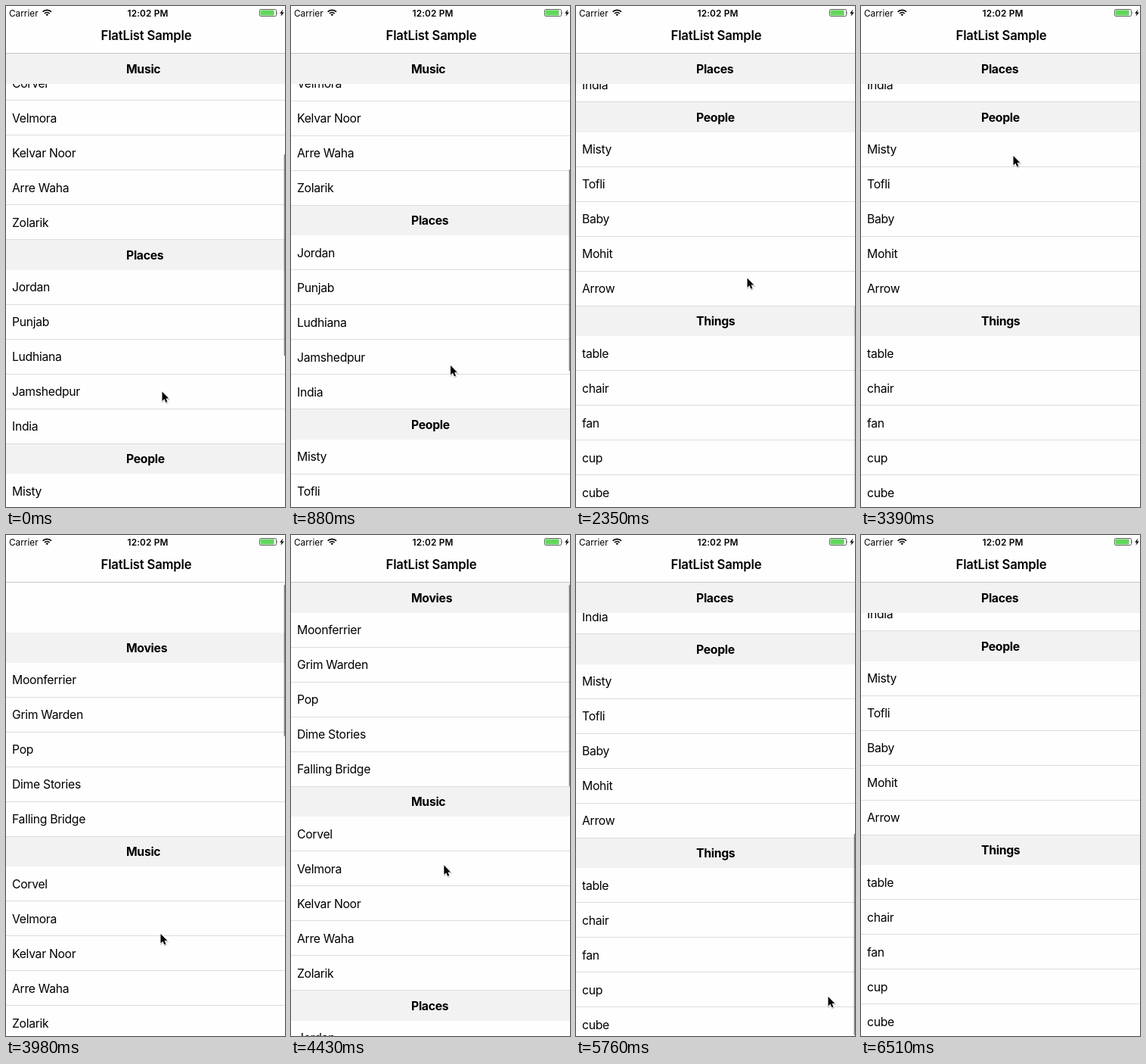
Write an HTML page that moves like this. It is 369x662 px and loops after 6810 ms.

```html
<!DOCTYPE html>
<html lang="en">
<head>
<meta charset="utf-8">
<title>FlatList Sample</title>
<style>
  html, body { margin: 0; width: 100%; height: 100%; overflow: hidden; background: #fefefe; }
  svg { display: block; width: 100vw; height: 100vh; }
  text { font-family: Inter, Roboto, sans-serif; fill: #000; white-space: pre; }
  .row { font-size: 15.75px; letter-spacing: -.3px; }
  .head { font-size: 15.75px; font-weight: 700; letter-spacing: -.3px; }
  .title { font-size: 16.7px; font-weight: 600; letter-spacing: -.2px; }
  .status { font-size: 11.8px; }
  rect { shape-rendering: crispEdges; }
  .smooth { shape-rendering: auto; }
</style>
</head>
<body>
<svg viewBox="0 0 369 662">
  <defs>
    <clipPath id="view"><rect y="63" width="369" height="599"/></clipPath>
  </defs>
  <rect width="369" height="662" fill="#fefefe"/>
  <g clip-path="url(#view)">
    <g id="rows"></g>
    <g id="heads"></g>
    <rect id="bar" class="smooth" x="367.7" width="3" rx="1" fill="#000"/>
  </g>
  <rect y="62" width="369" height="1" fill="#c6c6c6"/>
  <text class="status" x="4" y="13.8">Carrier</text>
  <g fill="none" stroke="#000" stroke-width="1.7">
    <path d="M48.6 7.6A8.2 8.2 0 0 1 60 7.6"/>
    <path d="M50.9 10A5 5 0 0 1 57.7 10"/>
    <path d="M52.5 11.3A2.7 2.7 0 0 1 56.1 11.3L54.3 13.3Z" fill="#000" stroke="none"/>
  </g>
  <text class="status" x="187.5" y="13.8" text-anchor="middle" font-weight="600" letter-spacing=".15">12:02 PM</text>
  <rect class="smooth" x="335.5" y="4.5" width="22" height="9" rx="1.6" fill="#fefefe" stroke="#555" stroke-width=".9"/>
  <rect class="smooth" x="336.6" y="5.6" width="18" height="6.8" rx=".6" fill="#62d75c"/>
  <path d="M358.5 7.4Q360.1 9 358.5 10.7Z" fill="#555"/>
  <path d="M366.2 4.6L362.2 9.8H364.6L363.4 13.8L367.8 8.4H365.2Z"/>
  <text class="title" x="185.5" y="44.5" text-anchor="middle">FlatList Sample</text>
  <g id="cursor">
    <g transform="scale(.93)">
      <path d="M.4 1.2V14.6L3.5 11.8L5.6 16.6L8 15.6L5.9 10.9H10Z" opacity=".22" stroke="#000" stroke-width="1.6"/>
      <path d="M0 0V13.4L3.1 10.6L5.2 15.4L7.4 14.4L5.4 9.8H9.4Z" stroke="#fff" stroke-width="1.6" paint-order="stroke" stroke-linejoin="round"/>
    </g>
  </g>
</svg>
<script>
const LOOP = 6810, STEP = 147.3; // the screen refreshes once per step
const TOP = 63, VIEW = 599, HEAD = 39.5, ROW = 46;
const SECTION = HEAD + 5 * ROW, END = 744.5;

const sections = [
  ['Movies', 'Moonferrier', 'Grim Warden', 'Pop', 'Dime Stories', 'Falling Bridge'],
  ['Music', 'Corvel', 'Velmora', 'Kelvar Noor', 'Arre Waha', 'Zolarik'],
  ['Places', 'Jordan', 'Punjab', 'Ludhiana', 'Jamshedpur', 'India'],
  ['People', 'Misty', 'Tofli', 'Baby', 'Mohit', 'Arrow'],
  ['Things', 'table', 'chair', 'fan', 'cup', 'cube']
];

const lin = u => u;
const drag = u => u ** 2.5;
const glide = u => 1 - (1 - u) ** 2.5;
const both = u => u * u * (3 - 2 * u);

// Moves: [first step, last step, easing, end value...]; values hold in between
const scroll = { from: [293], moves: [
  [0, 8, drag, 440], [8, 12, glide, 756], [12, 15, glide, END],
  [23, 27, both, -66], [27, 30, glide, 0],
  [30, 33, drag, 182.5], [33, 40, glide, END]
] };
const pointer = { from: [206.5, 509.5], moves: [
  [0, 9, drag, 226.5, 359.5], [16, 17, lin, 227, 473], [17, 20, both, 235, 236],
  [21, 23, both, 201.5, 198], [23, 27, both, 204.5, 527],
  [28, 33, both, 198.5, 269.5], [33, 39, both, 333.5, 610], [39, 41, lin, 360, 690]
] };
const fade = { from: [1], moves: [
  [13, 16, lin, 0], [23, 24, lin, 1], [41, 44, lin, 0]
] };

function at({ from, moves }, k) {
  let now = from;
  for (const [a, b, ease, ...to] of moves) {
    if (k <= a) break;
    const u = ease(Math.min(1, (k - a) / (b - a)));
    now = now.map((v, i) => v + (to[i] - v) * u);
  }
  return now;
}

const $ = id => document.getElementById(id);
function add(parent, tag, attrs, text) {
  const el = document.createElementNS('http://www.w3.org/2000/svg', tag);
  for (const k in attrs) el.setAttribute(k, attrs[k]);
  if (text) el.textContent = text;
  return parent.appendChild(el);
}
const move = (el, x, y) => el.setAttribute('transform', `translate(${x} ${y})`);

const heads = sections.map(([name, ...items], i) => {
  items.forEach((item, j) => {
    const y = i * SECTION + HEAD + j * ROW;
    add($('rows'), 'text', { class: 'row', x: 8, y: y + 28.6 }, item);
    add($('rows'), 'rect', { y: y + ROW - 1, width: 369, height: 1, fill: '#dcdcdc' });
  });
  const g = add($('heads'), 'g', {});
  add(g, 'rect', { width: 369, height: HEAD, fill: '#f2f2f2' });
  add(g, 'text', { class: 'head', x: 159, y: 25.6 }, name);
  return g;
});

function draw(k) {
  const [s] = at(scroll, k);
  move($('rows'), 0, TOP - s);
  heads.forEach((head, i) => {
    const y = TOP - s + i * SECTION;
    const pushed = y + SECTION - HEAD;
    move(head, 0, Math.max(y, Math.min(TOP, pushed)));
  });

  // The indicator shrinks while the list is pulled past either end
  const inside = Math.max(0, Math.min(END, s));
  const ratio = VIEW / (5 * SECTION);
  const bar = $('bar');
  bar.setAttribute('y', TOP + 2.7 + inside * ratio + Math.max(0, s - END));
  bar.setAttribute('height', VIEW * ratio - Math.abs(s - inside));
  bar.setAttribute('opacity', .5 * at(fade, k)[0]);

  move($('cursor'), ...at(pointer, k));
}

const start = performance.now();
function loop() {
  const t = (performance.now() - start) % LOOP;
  draw(Math.floor(t / STEP));
  requestAnimationFrame(loop);
}
loop();
</script>
</body>
</html>
```
